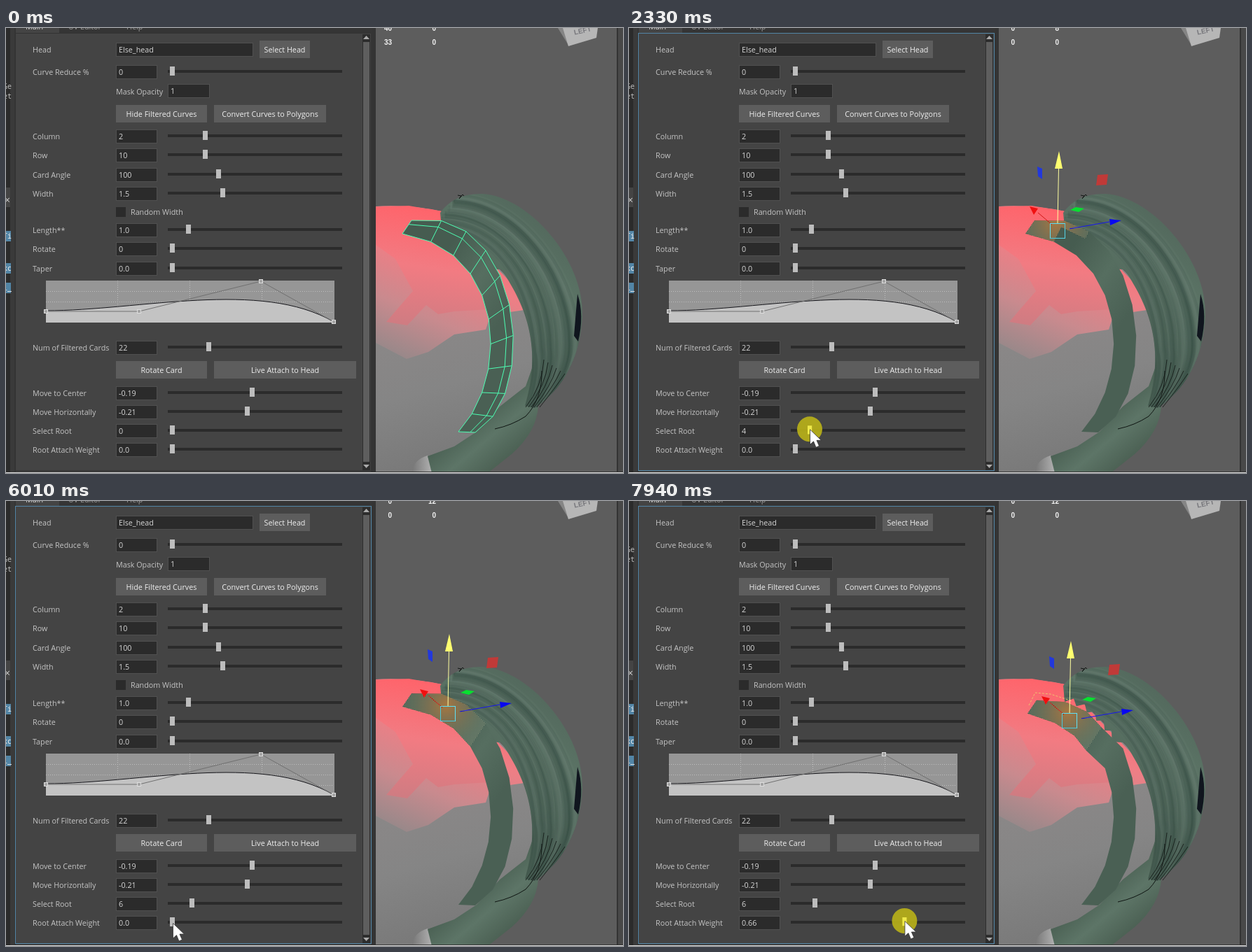
These frames come from a looping animation (881x636 px, 8 s). An HTML page with a canvas:

```html
<!DOCTYPE html>
<html lang="en">
<head>
<meta charset="utf-8">
<style>
html, body { margin: 0; height: 100%; overflow: hidden; background: #444; }
canvas { display: block; }
</style>
</head>
<body>
<canvas id="stage" width="881" height="636"></canvas>
<script>
const c = document.getElementById('stage').getContext('2d');
const LOOP = 8000, ROW = 27.3, MINT = '#4dffb3';
const UI = '10.75px "Open Sans", sans-serif';
const MONO = '10px "Noto Sans Mono", monospace';
const BOLD = 'bold 10px "Liberation Sans", Arial, sans-serif';

// ---------- helpers ----------
const mix = (a, b, f) => a + (b - a) * f;
const mixPoint = (p, q, f) => [mix(p[0], q[0], f), mix(p[1], q[1], f)];
// Parses "x,y x,y" into point pairs
const P = s => s.split(' ').map(p => p.split(',').map(Number));
// Point on a Bezier curve with any number of control points
const bezier = (pts, f) => pts.length === 1 ? pts[0]
  : bezier(pts.slice(1).map((p, i) => mixPoint(pts[i], p, f)), f);

function rect(x, y, w, h, fill) { c.fillStyle = fill; c.fillRect(x, y, w, h); }
function trace(pts, close) {
  c.beginPath();
  pts.forEach(([x, y]) => c.lineTo(x, y));
  if (close) c.closePath();
}
function poly(pts, fill) { trace(pts, true); c.fillStyle = fill; c.fill(); }
function line(pts, color, width = 1) {
  trace(pts); c.strokeStyle = color; c.lineWidth = width; c.stroke();
}
function shape(d, fill, stroke) {
  const p = new Path2D(d);
  if (fill) { c.fillStyle = fill; c.fill(p); }
  if (stroke) { c.strokeStyle = stroke; c.lineWidth = 1; c.stroke(p); }
}
function text(s, x, y, color = '#c4c4c4', align = 'left', font = UI) {
  c.font = font; c.fillStyle = color; c.textAlign = align;
  c.fillText(s, x, y);
}
function gradient(x0, y0, x1, y1, ...stops) {
  const g = c.createLinearGradient(x0, y0, x1, y1);
  stops.forEach((s, i) => g.addColorStop(i / (stops.length - 1), s));
  return g;
}
function random(seed) {
  return () => (seed = (seed * 16807) % 2147483647) / 2147483647;
}

// ---------- motion ----------
// The pointer travels in even steps: start, end, steps, x, y, easing
const moves = [
  [360, 1080, 12, 229, 586, f => 1 - (1 - f) ** 2],
  [1330, 1720, 5, 237, 574],
  [1880, 2590, 11, 270, 573],
  [2710, 2870, 3, 275, 572],
  [3460, 3640, 3, 270, 572],
  [4510, 4660, 1, 265, 573],
  [5250, 5640, 7, 243, 605],
  [5890, 6010, 3, 238, 603],
  [6980, 7730, 13, 380, 601, f => f ** 1.47],
  [7790, 7940, 3, 393.4, 600]
];
function cursorAt(t) {
  let p = [760, 640];
  for (const [start, end, steps, x, y, ease = f => f] of moves) {
    if (t < start) break;
    const step = Math.floor((t - start) / (end - start) * (steps - 1) + 1e-6) + 1;
    p = mixPoint(p, [x, y], ease(Math.min(1, step / steps)));
  }
  return p;
}
const sliderValue = t => (cursorAt(t)[0] - 237) / 237;
const rootSlider = t => t < 1880 ? 0 : sliderValue(Math.min(t, 5200));
const rootAt = t => Math.round(rootSlider(t) * 50);
const weightAt = t => t < 6980 ? 0 : sliderValue(t);

// ---------- settings panel ----------
function field(x, y, w, value) {
  rect(x - 1, y - 10, w + 2, 20, '#505050');
  rect(x, y - 9, w, 18, '#2b2b2b');
  text(value, x + 3, y + 4, '#d6d6d6');
}
function button(x, y, w, label) {
  rect(x, y, w, 25, '#5d5d5d');
  text(label, x + w / 2, y + 17, '#eeeeee', 'center');
}
// Evenly spaced rows of label, value and slider fraction
function sliders(top, ...rows) {
  rows.forEach(([label, value, f], i) => {
    const y = Math.round(top + i * ROW);
    text(label, 38, y + 4);
    field(158, y, 57, value);
    rect(231, y - 3, 249, 4, '#2b2b2b');
    rect(Math.round(233.5 + f * 237), y - 8, 7, 13, '#bdbdbd');
  });
}
function rampGraph() {
  const curve = 'M57 404C190 404 364 359 468 420';
  rect(57, 361, 412, 60, '#969696');
  c.setLineDash([1, 2]);
  for (let i = 1; i < 4; i++) {
    line([[57, 361.5 + i * 15], [468, 361.5 + i * 15]], '#bebebe');
    line([[56.5 + i * 103, 361], [56.5 + i * 103, 421]], '#bebebe');
  }
  c.setLineDash([]);
  shape(curve + 'V421H57Z', '#c3c3c3');
  shape(curve, null, '#15151a');
  const knots = P('57,405 190,405 364,362 468,420');
  line(knots, '#707070');
  for (const [x, y] of knots) {
    rect(x - 3, y - 3, 6, 6, '#dedede');
    rect(x - 2, y - 2, 4, 4, '#a4a4a4');
  }
}
function panel(t) {
  rect(0, 0, 528, 636, '#3a3a3a');
  rect(0, 0, 6, 636, '#2b2b2b');
  rect(0, 228, 6, 28, '#444');
  const scroll = t >= 6760 ? 14 : 0;
  ['Ge', 'et'].forEach((s, i) => text(s, -4, 87 + i * 14 - scroll, '#bbb', 'left', MONO));
  text('×', -2, 251, '#ccc', 'left', '14px "Open Sans", sans-serif');
  [['Ti', 290], ['kc', 336], ['l_', 364]].forEach(([s, y]) => {
    rect(0, y, 7, 15, '#5285a6');
    text(s, -4, y + 11, '#eee', 'left', MONO);
  });
  rect(12, 0, 511, 636, '#353535');
  rect(14, 0, 62, 7, '#444');
  [['Main', 28], ['UV Editor', 89], ['Help', 172]]
    .forEach(([s, x], i) => text(s, x, 2, i ? '#999' : '#ddd'));
  rect(14, 7, 507, 627, '#444444');
  c.lineWidth = 1;
  c.strokeStyle = t >= 1600 ? '#5285a6' : '#333';
  c.strokeRect(13.5, 7.5, 508, 625);

  rect(509, 9, 11, 623, '#2d2d2d');
  rect(510, 20, 9, 600, '#5e5e5e');
  poly(P('510,16 519,16 514.5,11'), '#aaa');
  poly(P('510,624 519,624 514.5,629'), '#aaa');

  text('Head', 38, 35);
  field(158, 31, 194, 'Else_head');
  button(362, 18, 72, 'Select Head');
  sliders(63, ['Curve Reduce %', '0', 0]);
  text('Mask Opacity', 157, 95);
  field(232, 90, 58, '1');
  button(157, 110, 130, 'Hide Filtered Curves');
  button(297, 110, 160, 'Convert Curves to Polygons');
  sliders(155, ['Column', '2', .2], ['Row', '10', .2], ['Card Angle', '100', .28], ['Width', '1.5', .305]);
  rect(157, 256, 14, 14, '#2b2b2b');
  text('Random Width', 178, 267);
  sliders(289, ['Length**', '1.0', .1], ['Rotate', '0', 0], ['Taper', '0.0', 0]);
  rampGraph();
  sliders(457, ['Num of Filtered Cards', '22', .22]);
  button(157, 476, 130, 'Rotate Card');
  button(297, 476, 203, 'Live Attach to Head');
  const weight = weightAt(t);
  sliders(521.5, ['Move to Center', '-0.19', .485], ['Move Horizontally', '-0.21', .455],
    ['Select Root', rootAt(t), rootSlider(t)],
    ['Root Attach Weight', weight ? weight.toFixed(2) : '0.0', weight]);
}

// ---------- viewport ----------
const innerEdge = P('566,294 716,317 718,502 646,577');
const outerEdge = P('579,275 733,248 767,522 670,578');

function head() {
  shape('M528 255Q575 252 622 262L760 400 752 520 690 600 650 636H528Z',
    gradient(570, 400, 640, 636, '#8c8888', '#858585', '#777777'));
  shape('M528 255Q575 252 622 262L722 365 740 403 692 410 685 431 640 438 603 463 572 473 528 450Z',
    gradient(630, 265, 545, 468, '#fb666d', '#ef7e85', '#c98a8e', '#948889'));
  poly(P('528,256 575,254 622,262 680,325 690,402 640,405 617,409 600,396 573,425 543,420 561,399 581,376 556,330 528,310'),
    gradient(600, 255, 575, 425, '#ff636a', '#f27b82', '#cf7c82'));
  shape('M580 636Q580 618 602 611L610 636Z', gradient(580, 0, 610, 0, '#777', '#b5b5b5'));
}

// Smooth silhouette outside, small teeth where the hair meets the card
let teeth = '';
for (let i = 0; i < 12; i++) {
  const [x, y] = bezier(outerEdge, .37 - i * .023), depth = i % 2 ? 12 : 3;
  teeth += `L${x - depth * .5} ${y + depth * .8}`;
}
const hairShape = new Path2D('M620 264Q640 236 680 237C745 240 826 330 823 412Q818 500 755 543L741 540C765 460 745 400 707 345' + teeth + 'Z');

function hair() {
  shape('M754 478L742 512 705 541 672 577 640 598 602 612 608 636H688L722 609Q758 577 760 540Z',
    gradient(660, 560, 710, 620, '#4a6053', '#5d7567', '#4c6154'));
  c.save();
  c.clip(hairShape);
  rect(600, 230, 230, 320, gradient(680, 440, 790, 290, '#465c50', '#52695c', '#5a7264', '#53695d'));
  const rnd = random(77);
  for (let k = 0; k < 1; k += .03) {
    const j = rnd() * 14;
    c.strokeStyle = rnd() < .5 ? 'rgba(45,64,53,.13)' : 'rgba(115,140,125,.1)';
    c.lineWidth = 4 + rnd() * 10;
    c.beginPath();
    c.moveTo(615 + k * 30, 285 - k * 46);
    c.bezierCurveTo(690 + k * 50, 285 - k * 45, 745 + k * 82, 350 + j, 752 + k * 66, 450 + j);
    c.quadraticCurveTo(762 + k * 52, 490, 745 + k * 30, 548);
    c.stroke();
  }
  c.restore();
  shape('M816 380Q826 410 817 448L811 440Z', '#10151e');
  for (let i = 0; i < 6; i++) shape(`M${768 + i * 6} ${474 + i * 4}Q${766 + i * 4} 512 ${742 + i * 4} 542`, null, 'rgba(15,21,18,.8)');
  shape('M765 490Q766 530 742 555 722 568 698 573M645 239l5 1-3 4 5-6 2 2', null, '#0f1512');
}

// The first four rows are pulled onto the head as the weight grows
function cardEdge(curve, weight) {
  return Array.from({ length: 11 }, (_, i) => {
    const [x, y] = bezier(curve, i / 10), pull = i < 4 ? weight / .66 : 0;
    return [x + (3 - 1.5 * i * i) * pull, y + (10 + 4 * i - 1.8 * i * i) * pull];
  });
}
function card(selected, weight) {
  const inner = cardEdge(innerEdge, weight), outer = cardEdge(outerEdge, weight);
  const middle = inner.map((p, i) => mixPoint(p, outer[i], .7));
  const strip = (a, b, from, to) => [...a.slice(from, to), ...b.slice(from, to).reverse()];
  poly(strip(inner, outer, 0, 11), gradient(620, 330, 720, 400, '#465c50', '#566e60', '#4a6054'));

  if (!selected) {
    [inner, middle, outer].forEach(edge => line(edge, MINT));
    inner.forEach((p, i) => line([p, middle[i], outer[i]], MINT));
    return;
  }
  // Two of the three vertices in a row are picked per unit of the slider
  const picked = inner.flatMap((p, i) => [outer[i], middle[i], p]).slice(0, selected * 2);
  const [px, py] = [0, 1].map(axis => picked.reduce((sum, p) => sum + p[axis], 0) / picked.length);
  const full = Math.floor(picked.length / 3);
  const zones = [strip(inner, outer, 0, full)];
  if (picked.length % 3 === 2 && full) zones.push(strip(middle, outer, full - 1, full + 1));

  const glow = c.createRadialGradient(px, py - 10, 4, px, py - 10, 55);
  glow.addColorStop(0, 'rgba(190,110,40,.7)');
  glow.addColorStop(.5, 'rgba(150,105,60,.4)');
  glow.addColorStop(1, 'rgba(120,110,70,0)');
  for (const zone of zones) {
    c.save();
    trace(zone, true);
    c.clip();
    rect(550, 260, 180, 130, glow);
    c.setLineDash([1, 1]);
    for (let y = 270; y < 385; y += 2) line([[560, y + .5], [720, y + .5]], 'rgba(180,178,145,.7)');
    c.restore();
  }
  if (weight > .15) {
    c.setLineDash([3, 2]);
    line(P('571,292 580,274 602,276 633,286'), 'rgba(235,215,110,.8)');
    c.setLineDash([]);
  }
  manipulator(px + 3, py + 2);
}
function manipulator(x, y) {
  c.save();
  c.translate(Math.round(x), Math.round(y));
  line(P('-8,-9 -28,-26'), '#d01818');
  poly(P('-40,-35 -28,-32 -34,-23'), '#f01010');
  line(P('17,-3 74,-13'), '#1515f0');
  poly(P('74,-17 75,-8 91,-15'), '#0808f0');
  line(P('0,-10 1.5,-90'), '#ffffa0');
  poly(P('2,-114 -4,-89 7,-89'), '#ffff70');
  poly(P('-29,-92 -22,-89 -22,-74 -28,-78'), '#2238dc');
  poly(P('57,-80 72,-81 70,-66 55,-65'), '#c03a38');
  poly(P('18,-30 26,-34 38,-32 30,-27'), '#08e030');
  c.strokeStyle = '#55d4e8';
  c.lineWidth = 1;
  c.strokeRect(-10.5, -10.5, 21, 21);
  c.restore();
}
function hud(selected) {
  const put = (s, x, y) => text(s, x, y, '#f2f2f2', 'right', BOLD);
  put(selected ? 0 : 40, 551, 4);
  put(selected ? 0 : 33, 551, 24);
  put(selected * 2, 614, 4);
  put(0, 614, 24);
  poly(P('788,0 796,0 804,26'), '#858585');
  poly(P('795,0 845,0 843,14 803,26'), '#b6b6b6');
  c.save();
  c.translate(824, 7);
  c.rotate(-.22);
  text('LEFT', 0, 0, '#77777c', 'center', BOLD);
  c.restore();
}
function viewport(t) {
  rect(523, 0, 358, 636, '#343434');
  rect(874, 0, 7, 634, '#484848');
  c.save();
  c.beginPath();
  c.rect(528, 0, 344, 634);
  c.clip();
  rect(528, 0, 344, 634, '#5d5d5d');
  const lag = t - 70, selected = rootAt(lag); // the mesh follows the sliders late
  head();
  hair();
  card(selected, weightAt(lag));
  hud(selected);
  c.restore();
}

// ---------- pointer ----------
function pointer(t) {
  if (t < 360) return;
  const [x, y] = cursorAt(t);
  if (t >= 1640 && t < 5250 || t >= 6760) {
    c.beginPath();
    c.arc(x, y, 18, 0, Math.PI * 2);
    c.fillStyle = 'rgba(184,176,26,.92)';
    c.fill();
    rect(x - 3, y - 5, 6, 12, '#efe94a');
  }
  c.save();
  c.translate(x, y);
  const arrow = P('0.5,0.5 0.5,22 5.5,17.5 9,26 13.5,24 10,16 16.5,16');
  poly(arrow, '#fff');
  line([...arrow, arrow[0]], '#333', .8);
  c.restore();
}

function frame(now) {
  const t = now % LOOP;
  panel(t);
  viewport(t);
  pointer(t);
  rect(0, 635, 881, 1, '#e4e4e4');
  requestAnimationFrame(frame);
}
requestAnimationFrame(frame);
</script>
</body>
</html>
```
